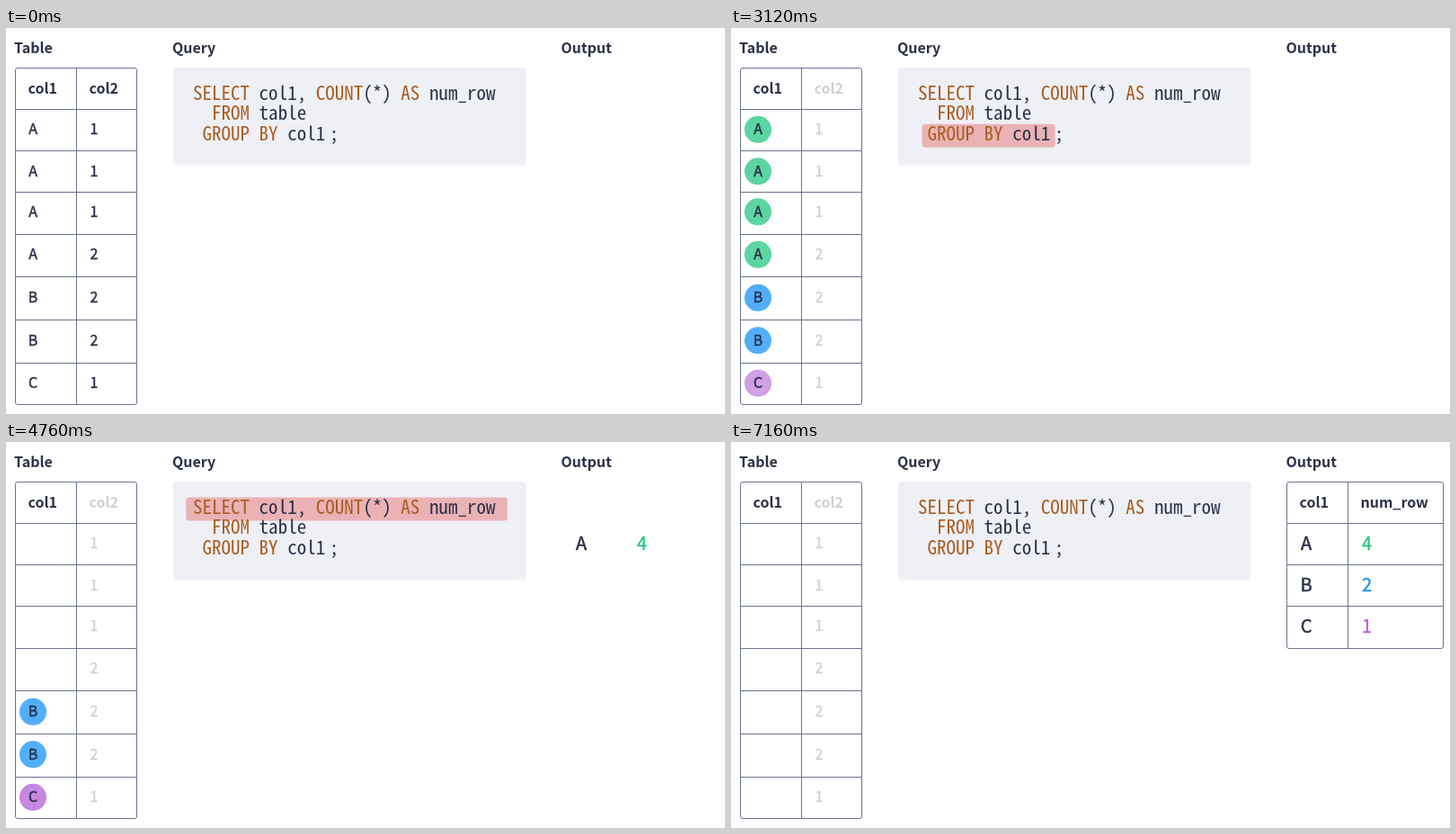
An HTML page that plays this animation: 800x429 px, repeating every 8 s.

```html
<!DOCTYPE html>
<html lang="en">
<head>
<meta charset="utf-8">
<title>GROUP BY with COUNT</title>
<style>
  html, body { margin: 0; width: 100%; height: 100%; overflow: hidden; background: #fff; }
  svg { display: block; width: 100%; height: 100%; }
  text {
    font: 16px "Noto Sans CJK JP", "Noto Sans CJK SC", "Noto Sans CJK KR", "Noto Sans CJK", "Open Sans", sans-serif;
    fill: #2b3048;
    white-space: pre;
  }
  .bold { font-weight: 700; }
  .value { text-anchor: middle; stroke: #2b3048; stroke-width: .45px; }
  .count { font-size: 20px; text-anchor: middle; stroke-width: .45px; }
  .code text {
    font: 21.04px "Noto Sans Mono CJK JP", "Noto Sans Mono CJK SC", "Noto Sans Mono CJK KR", "Noto Sans Mono", monospace;
    font-size-adjust: ch-width 0.5;
  }
  .code tspan { fill: #a85e22; }
  .grid { fill: none; stroke: #6b7391; stroke-width: 1; }
</style>
</head>
<body>
<svg id="stage" viewBox="0 0 800 429">
  <text class="bold" x="9" y="28">Table</text>
  <text class="bold" x="185" y="28">Query</text>
  <text class="bold" x="617.5" y="28">Output</text>

  <rect x="186" y="44" width="392.5" height="109" rx="4" fill="#eff0f6"/>
  <rect id="marker" rx="4" height="26" fill="#e68282" fill-opacity=".56"/>
  <g class="code">
    <text x="208" y="79.5"><tspan>SELECT</tspan> col1, <tspan>COUNT</tspan>(*) <tspan>AS</tspan> num_row</text>
    <text x="208" y="102">  <tspan>FROM</tspan> table</text>
    <text x="208" y="124.5"> <tspan>GROUP BY</tspan> col1</text>
    <text x="359.7" y="124.5">;</text>
  </g>

  <g id="table"><text class="bold" x="24.5" y="73">col1</text></g>
  <g id="col2"><text class="bold" x="92.5" y="73">col2</text></g>
  <g id="result">
    <text class="bold" x="632.5" y="73">col1</text>
    <text class="bold" x="700.5" y="73">num_row</text>
  </g>
  <g id="counts"></g>
  <g id="tokens"></g>
</svg>
<script>
const LOOP = 8000, STEP = 40;
const $ = id => document.getElementById(id);

function add(parent, tag, attrs, text = '') {
  const el = document.createElementNS('http://www.w3.org/2000/svg', tag);
  for (const key in attrs) el.setAttribute(key, attrs[key]);
  el.textContent = text;
  parent.append(el);
  return el;
}

function drawGrid(parent, left, divider, right, lines) {
  const top = lines[0], bottom = lines.at(-1);
  add(parent, 'rect', { class: 'grid', x: left, y: top, width: right - left, height: bottom - top, rx: 2.5 });
  const rules = lines.slice(1, -1).map(y => `M${left} ${y}H${right}`).join('');
  add(parent, 'path', { class: 'grid', d: `M${divider} ${top}V${bottom}${rules}` });
}

const groups = {
  A: { disc: '#5bd5a1', ink: '#2fc786', count: 4, y: 112.5, show: 1600, fly: 4400 },
  B: { disc: '#52aefa', ink: '#2196f3', count: 2, y: 158.5, show: 2400, fly: 5200 },
  C: { disc: '#c587e0', ink: '#b65fd9', count: 1, y: 204.5, show: 3000, fly: 6000 }
};
const rows = [
  ['A', 1, 112.5], ['A', 1, 159], ['A', 1, 204], ['A', 2, 251.5],
  ['B', 2, 299.5], ['B', 2, 347], ['C', 1, 394.5]
];

drawGrid($('table'), 10.5, 78.5, 145.5, [44.5, 90.5, 136.5, 182.5, 229.5, 276.5, 324.5, 372.5, 418.5]);
drawGrid($('result'), 618.5, 686.5, 792.5, [44.5, 90.5, 136.5, 182.5, 229.5]);

for (const group of Object.values(groups)) {
  group.label = add($('counts'), 'text', {
    class: 'count', x: 707.5, y: group.y + 7.3, fill: group.ink, stroke: group.ink
  }, group.count);
  group.label.style.fill = group.ink;
  group.size = 0;
}

const tokens = rows.map(([name, number, y]) => {
  const group = groups[name];
  add($('col2'), 'text', { class: 'value', x: 98, y: y + 5.9 }, number);
  const body = add($('tokens'), 'g', {});
  const disc = add(body, 'circle', { cy: .3, r: 15, fill: group.disc });
  const letter = add(body, 'text', { class: 'value', y: 5.9 }, name);
  return { group, y, body, disc, letter, delay: STEP * group.size++ };
});

const mix = (a, b, p) => a + (b - a) * p;
// Each change has already made its first step at its start time.
const ramp = (t, start, length = 400) => Math.min(1, Math.max(0, (t - start + STEP) / length));

function render(time) {
  const t = Math.floor(time % LOOP / STEP) * STEP;

  const slide = ramp(t, 3600);
  const marker = $('marker');
  marker.setAttribute('x', mix(212.3, 200.3, slide));
  marker.setAttribute('y', mix(106.7, 61.5, slide));
  marker.setAttribute('width', mix(148.4, 357.7, slide));
  marker.setAttribute('opacity', ramp(t, 800) - ramp(t, 6800));

  $('col2').setAttribute('opacity', mix(1, .22, ramp(t, 1600, 200)));
  $('result').setAttribute('opacity', ramp(t, 6800));

  for (const { group, y, body, disc, letter, delay } of tokens) {
    const p = ramp(t, group.fly);
    body.setAttribute('transform', `translate(${mix(30, 640, p)} ${mix(y, group.y, p)})`);
    disc.setAttribute('opacity', ramp(t, group.show + delay, 200) * (1 - p));
    letter.setAttribute('transform', `scale(${mix(1, 1.25, p)})`);
    // Once merged, one letter stands for the whole group.
    body.setAttribute('visibility', p === 1 && delay ? 'hidden' : 'visible');
    group.label.setAttribute('opacity', p);
  }
}

const begin = performance.now();
function tick() {
  render(performance.now() - begin);
  requestAnimationFrame(tick);
}
tick();
</script>
</body>
</html>
```
